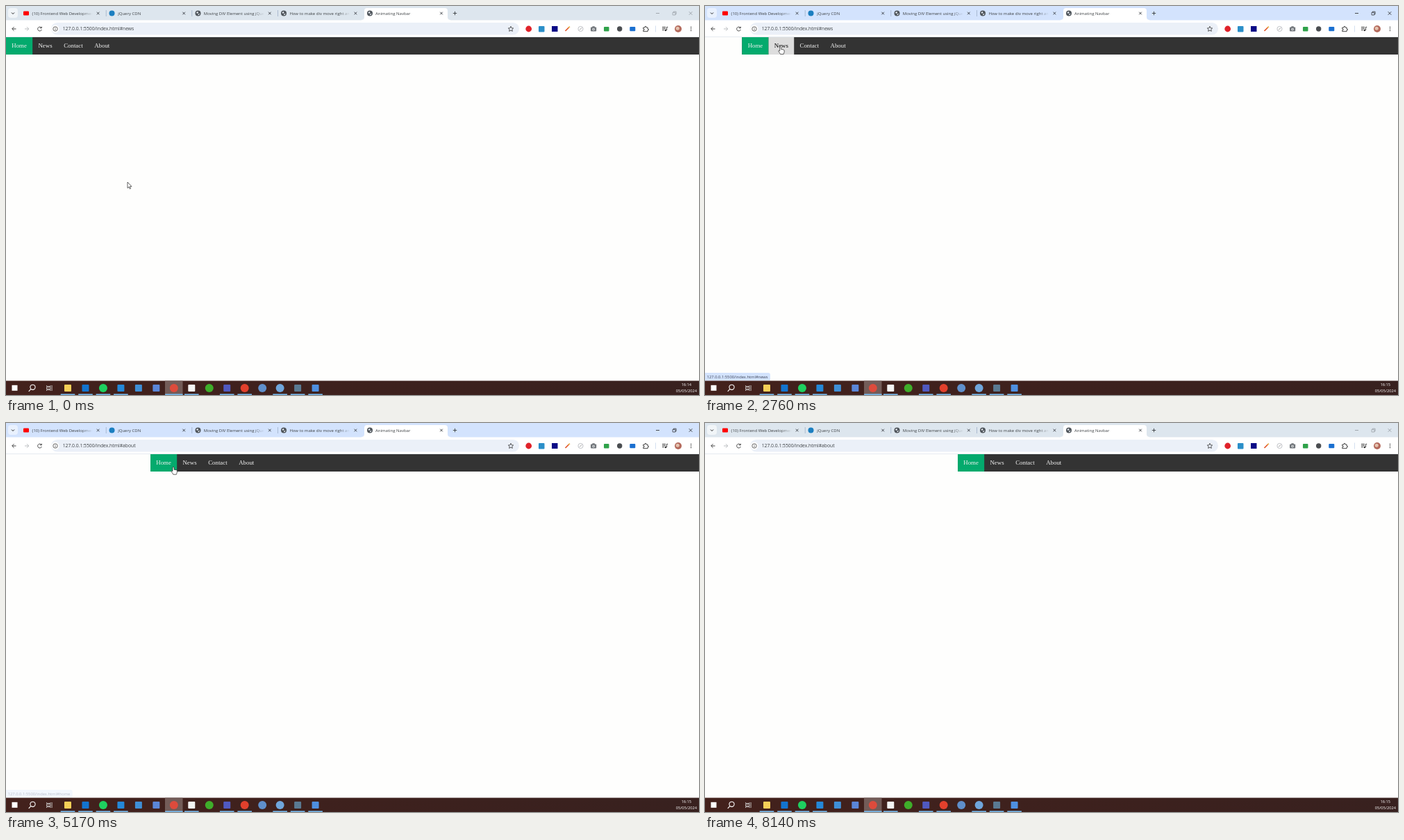
Animation, 998 px wide and 561 px high, one loop 8690 ms. Source, as an HTML page with a canvas:

```html
<!DOCTYPE html>
<html lang="en">
<head>
<meta charset="utf-8">
<title>Animating Navbar</title>
<style>
html, body { margin: 0; width: 100%; height: 100%; overflow: hidden; }
canvas { display: block; }
</style>
</head>
<body>
<canvas id="stage" width="998" height="561"></canvas>
<script>
const ctx = document.getElementById('stage').getContext('2d');
const LOOP = 8690, STEP = 52, SLIDE = 400;
const UI = '"Open Sans", "Noto Sans", sans-serif';
const SERIF = '8.84px "Liberation Serif", serif';
const INK = '#3c4043';

// Each click: slide start and the hash it puts in the address bar
const clicks = [[1905, 'home'], [2720, 'news'], [3680, 'about'], [4600, 'about'],
  [5480, 'home'], [5930, 'contact'], [6560, 'about']];
// Pointer tip: time, x, y
const track = [[550, 175, 254], [1340, 20, 57], [1830, 20, 57], [2070, 64, 60.5],
  [2500, 105, 58], [2690, 105, 58], [3380, 231, 67.5], [3480, 238, 63], [3660, 238, 63],
  [4140, 372, 66.5], [4410, 300, 60], [4590, 300, 60], [4850, 290, 85], [5050, 250, 82],
  [5170, 241, 63], [5450, 228, 58], [5480, 228, 58], [5850, 355, 60], [5930, 355, 60],
  [6280, 457, 62], [6410, 454, 57], [6550, 454, 57], [7280, 655, 528]];
// When the link bubble is up
const bubbles = [[1220, 4040], [4330, 4700], [5125, 6680]];

const clamp = v => Math.min(1, Math.max(0, v));
const swing = p => 0.5 - Math.cos(clamp(p) * Math.PI) / 2;

function box(x, y, w, h, color, r = 0) {
  ctx.fillStyle = color;
  ctx.beginPath();
  ctx.roundRect(x, y, w, h, r);
  ctx.fill();
}
function disc(x, y, r, color) { box(x - r, y - r, 2 * r, 2 * r, color, r); }
function draw(d, x, y, stroke, width = 0.9, fill) {
  const p = new Path2D(d);
  ctx.save();
  ctx.translate(x, y);
  if (fill) { ctx.fillStyle = fill; ctx.fill(p); }
  if (stroke) { ctx.strokeStyle = stroke; ctx.lineWidth = width; ctx.stroke(p); }
  ctx.restore();
}
function text(s, x, y, size, color, align = 'left') {
  ctx.font = size + 'px ' + UI;
  ctx.textAlign = align;
  ctx.fillStyle = color;
  ctx.fillText(s, x, y);
}
function fade(color, from, to) {
  const g = ctx.createLinearGradient(from, 0, to, 0);
  g.addColorStop(0, color);
  g.addColorStop(1, color + '00');
  return g;
}

let edge = 0;
ctx.font = SERIF;
const items = ['Home', 'News', 'Contact', 'About'].map(name => {
  const w = ctx.measureText(name).width + 16.6, x = edge;
  edge += w;
  return { name, x, w };
});

function globe(x, y) {
  disc(x, y, 4, '#50565c');
  draw('M-2.6-1.2L-.4-2.4 .6-1-1 .6ZM.4 1L2.6.2 1.4 2.6 0 2.4Z', x, y, null, 0, '#e8edf3');
}

function tabs(active) {
  const bar = active ? '#d3e3fd' : '#dde6ee';
  box(0, 0, 998, 21, bar);
  box(3, 3, 14, 14, active ? '#e9f1fe' : '#f1f5f8', 4);
  draw('M-2-1L0 1 2-1', 10, 10.5, '#222', 1);
  draw('M512 20Q516 20 516 16V7Q516 3 520 3H632Q636 3 636 7V16Q636 20 640 20V21H512Z', 0, 0, null, 0, '#fff');
  box(25, 7.5, 8, 6, '#f00', 1);
  disc(152.5, 10.5, 4, '#1b7fc0');
  [276.5, 400, 524].forEach(x => globe(x, 10.5));
  ['(10) Frontend Web Development', 'jQuery CDN', 'Moving DIV Element using jQuery',
    'How to make div move right and left', 'Animating Navbar'].forEach((s, i) => {
    const x = 37.6 + 123.6 * i;
    text(s, x, 12.8, 6, fade(INK, x + 72, x + 87));
    draw('M-1.8-1.8L1.8 1.8M1.8-1.8L-1.8 1.8', x + 95, 10.5, '#30343a', 0.9);
    if (i < 3) box(x + 106.2, 6, 0.8, 9, '#9fb0c8');
  });
  draw('M-2.7 0H2.7M0-2.7V2.7', 646.5, 10.5, INK, 0.9);
  const ctl = active ? '#222' : '#92999f';
  draw('M-2.5.5H2.5', 938.5, 10, ctl, 0.8);
  draw('M-2.4-1.2H1.4V2.5H-2.4ZM-1.2-1.2V-2.4H2.6V1.3H1.4', 962.5, 10.5, ctl, 0.7);
  draw('M-2.3-2.3L2.3 2.3M2.3-2.3L-2.3 2.3', 986, 10.5, ctl, 0.8);
}

function toolbar(hash) {
  box(0, 20.5, 998, 24.5, '#fff');
  box(0, 44, 998, 1, '#e6ebf1');
  box(65, 24, 674, 17.5, '#ebf0f8', 9);
  const arrow = 'M3 0H-2.6M0-2.8L-2.8 0 0 2.8';
  draw(arrow, 11.5, 33, '#333');
  draw('M-3 0H2.6M0-2.8L2.8 0 0 2.8', 30, 33, '#b4b7ba');
  draw('M2.4-1.6A2.9 2.9 0 1 0 2.8 1M2.8-3.2V-1.2H.6', 48.5, 33, '#333');
  disc(71, 33, 5.5, '#fff');
  draw('M3.2 0A3.2 3.2 0 1 1-3.2 0A3.2 3.2 0 1 1 3.2 0M0-.4V1.8M0-1.9V-1.1', 71, 33, '#444', 0.8);
  text('127.0.0.1:5500/index.html#' + hash, 81.7, 35.4, 6.78, INK);
  draw('M0-3.7L1.1-1.2 3.7-1 1.8.8 2.3 3.4 0 2.1-2.3 3.4-1.8.8-3.7-1-1.1-1.2Z', 727, 33, '#333', 0.8);

  disc(752.7, 33, 4.4, '#e0222a');
  box(767, 29, 8.5, 8.5, '#2b8fc9', 1);
  box(786, 29, 8.5, 8, '#0b0b86');
  draw('M-3 3L2-2', 808.5, 33, '#e2572b', 1.7);
  draw('M1.6-1.6L3.4-3.4', 808.5, 33, '#e8b44a', 1.8);
  draw('M3.6 0A3.6 3.6 0 1 1-3.6 0A3.6 3.6 0 1 1 3.6 0', 827.5, 33, '#b9bcc0', 0.9);
  draw('M-1.5 1.5L1.6-1.6', 827.5, 33, '#999', 1);
  box(842, 30.5, 8.2, 6, '#70757a', 1);
  box(844.3, 29.3, 3.6, 2, '#70757a', 0.5);
  disc(846.1, 33.5, 1.7, '#fff');
  disc(846.1, 33.5, 0.9, '#70757a');
  box(861, 30, 7.5, 6.5, '#2fa24a', 1);
  disc(883.7, 33, 3.7, '#4a4d50');
  box(898.3, 30, 8, 6.3, '#1a6fd0', 1);
  draw('M-3.2-2H-.9Q-1-3.8.1-3.8 1.2-3.8 1.1-2H3.1V.1Q4.6 0 4.6 1 4.6 2 3.1 1.9V3.7H-3.2V1.9Q-1.6 2-1.6 1-1.6 0-3.2.1Z', 921, 33, '#333', 0.9);
  box(935, 28.5, 0.8, 9, '#c9d8ee');
  draw('M-4-2.5H1M-4-.4H1M-4 1.7H-1.2M2.6 1.8V-2.6H4.2', 949, 33, '#333', 0.9);
  disc(949.9, 35, 1.3, '#333');
  disc(968, 33, 5, '#b46a5c');
  disc(967.2, 32.3, 2.5, '#e4c3b0');
  [-2.6, 0, 2.6].forEach(d => disc(986.5, 33 + d, 0.75, '#333'));
}

function navbar(x, hover) {
  box(x, 45, 998 - x, 25, '#333');
  items.forEach(it => {
    const home = it.name === 'Home', lit = it === hover && !home;
    if (home || lit) box(x + it.x, 45, it.w, 25, home ? '#04aa6d' : '#ddd');
    ctx.font = SERIF;
    ctx.textAlign = 'left';
    ctx.fillStyle = lit ? '#000' : '#f2f2f2';
    ctx.fillText(it.name, x + it.x + 8.3, 60.3);
  });
}

function taskbar(time) {
  const g = ctx.createLinearGradient(0, 0, 998, 0);
  g.addColorStop(0, '#43211c');
  g.addColorStop(1, '#38211f');
  box(0, 540.5, 998, 20.5, g);
  box(229, 540.5, 25.5, 20.5, '#735c58');
  box(8.5, 546.8, 8, 8, '#fff');
  draw('M4.6-1.2A3.6 3.6 0 1 1-2.6-1.2A3.6 3.6 0 1 1 4.6-1.2M-1.6 1.4L-4.8 4.8', 37.5, 551, '#fff', 1.1);
  draw('M-4-3.8V-2.4H1.6V-3.8M-4 4V2.6H1.6V4M-4-1.2H1.6V1.3H-4ZM3.6-4V4', 62.5, 551, '#ddd', 0.8);
  const icons = [['#f6cf57', 1], ['#1374cf', 1], ['#1ed05f', 0], ['#2488d8', 1], ['#3f8fd6', 1],
    ['#5b86d8', 1], ['#dd4b3c', 0], ['#f4f4f4', 1], ['#3fae2a', 0], ['#5059c0', 1],
    ['#e2402c', 0], ['#5f8fcb', 0], ['#6fa6dc', 0], ['#5a7a92', 1], ['#4e8fe0', 1]];
  icons.forEach(([color, square], i) => {
    const x = 89 + 25.47 * i;
    if (square) box(x - 5, 546, 10, 10, color, 1);
    else disc(x, 551, 6, color);
    if (![4, 5, 8, 11].includes(i)) {
      const half = i === 6 ? 12.7 : 10.3;
      box(x - half, 559.4, half * 2, 1.6, '#76b9ed');
    }
  });
  text(time, 979.8, 548.2, 5.6, '#fff', 'center');
  text('05/05/2024', 979.8, 557.4, 5.7, '#fff', 'center');
}

function bubble(t, name) {
  const alpha = Math.max(...bubbles.map(([a, b]) => clamp(Math.min((t - a) / 150, (b + 150 - t) / 150))));
  if (!alpha) return;
  const s = '127.0.0.1:5500/index.html#' + name;
  ctx.globalAlpha = alpha;
  ctx.font = '5.8px ' + UI;
  box(0, 529, ctx.measureText(s).width + 6, 11.5, '#d3e3fd', [0, 3, 0, 0]);
  text(s, 2.7, 537, 5.8, '#40485a');
  ctx.globalAlpha = 1;
}

function pointer(t) {
  const i = track.findIndex(k => k[0] > t);
  if (i < 0) return null;
  if (!i) return track[0].slice(1);
  const [t0, x0, y0] = track[i - 1], [t1, x1, y1] = track[i];
  const p = (t - t0) / (t1 - t0), e = p * p * (3 - 2 * p);
  return [x0 + (x1 - x0) * e, y0 + (y1 - y0) * e];
}

function render(t) {
  const x = clicks.reduce((sum, [at]) => sum + STEP * swing((t - at) / SLIDE), 0);
  const hash = clicks.reduce((h, [at, name]) => t >= at ? name : h, 'news');
  const tip = pointer(t);
  const hover = tip && tip[1] >= 45 && tip[1] < 70 &&
    items.find(it => tip[0] >= x + it.x && tip[0] < x + it.x + it.w);

  box(0, 0, 998, 561, '#fefefd');
  tabs(t >= 1830 && t < 8140);
  toolbar(hash);
  navbar(x, hover);
  bubble(t, hover ? hover.name.toLowerCase() : 'about');
  taskbar(t < 1500 ? '16:14' : '16:15');
  if (hover) {
    draw('M-1 1Q0-.7 1 1V4.2Q5 4.3 5.4 5.6V8Q5 9.5 4.4 11.2H-.2Q-1 9.5-3 6.8-2.7 5-1 6.6Z', ...tip, '#222', 0.7, '#fff');
  } else if (tip) {
    draw('M0 0V8.6L2 6.8 3.3 9.8 4.6 9.2 3.3 6.3H6Z', ...tip, '#222', 0.7, '#fff');
  }
}

const start = performance.now();
function tick() {
  render((performance.now() - start) % LOOP);
  requestAnimationFrame(tick);
}
tick();
</script>
</body>
</html>
```
